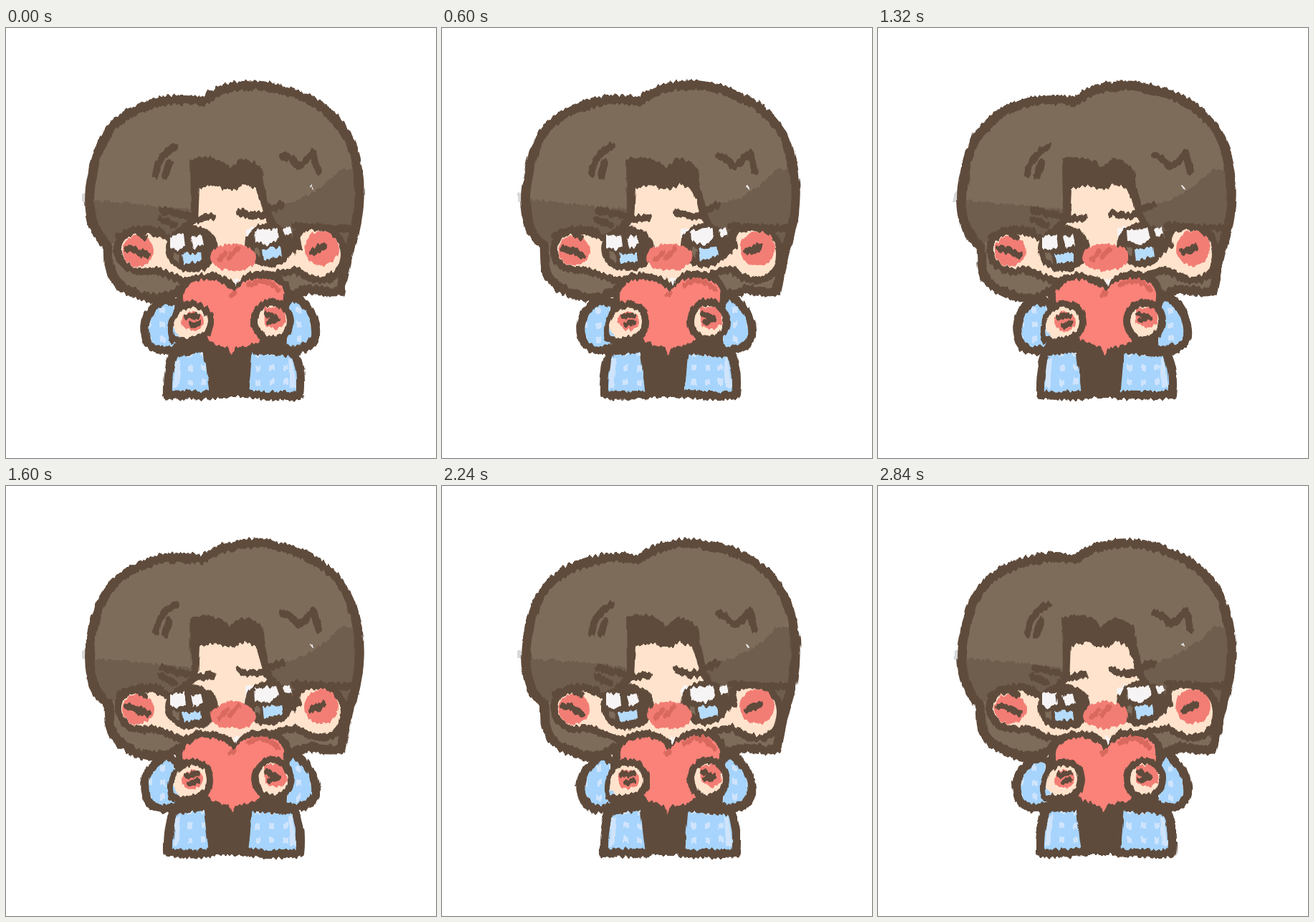
An HTML page for the animation above (2.88 s loop, 600 by 600 pixels).

```html
<!DOCTYPE html>
<html lang="en">
<head>
<meta charset="utf-8">
<title>Shy heart</title>
<style>
  html, body { margin: 0; width: 100%; height: 100%; overflow: hidden; background: #fff; }
  svg { display: block; width: 100vw; height: 100vh; }
  svg { --ink: #5f4b3c; --hair: #7e6c5b; --shade: #6f5d4e; --skin: #ffe3cc;
        --pink: #fa8279; --blush: #f27d74; --red: #d9695f; --sky: #a6d4fd; --pale: #cfe4fc; }
  path, ellipse { stroke-linecap: round; stroke-linejoin: round; }
  .ink { fill: var(--ink); }
  .line { fill: none; stroke: var(--ink); stroke-width: 10; }
  .hair { fill: var(--hair); }
  .shade { fill: var(--shade); }
  .skin { fill: var(--skin); }
  .pink { fill: var(--pink); }
  .blush { fill: var(--blush); }
  .sky { fill: var(--sky); }
  .pale { fill: var(--pale); }
  .white { fill: #f7f4f5; }
  .red { fill: none; stroke: var(--red); stroke-width: 7; }
  .clothes { fill: url(#plaid); stroke: var(--ink); stroke-width: 12; }
  .outlined { stroke: var(--ink); stroke-width: 20; paint-order: stroke; }
</style>
</head>
<body>
<svg viewBox="0 0 600 600">
  <defs>
    <!-- Slow sideways wobble, then fine vertical bristles -->
    <filter id="rough" filterUnits="userSpaceOnUse" x="0" y="0" width="600" height="600"
            color-interpolation-filters="sRGB">
      <feTurbulence class="noise" type="fractalNoise" baseFrequency=".03" result="slow"/>
      <feColorMatrix in="slow" values="1 0 0 0 0  0 1 0 0 0  0 0 1 0 0  0 0 0 0 1" result="wobble"/>
      <feDisplacementMap in="SourceGraphic" in2="wobble" scale="4"
                         xChannelSelector="R" yChannelSelector="G" result="bent"/>
      <feTurbulence class="noise" type="fractalNoise" baseFrequency=".24 .04" result="fast"/>
      <feColorMatrix in="fast" values=".35 0 0 0 .325  0 1 0 0 0  0 0 1 0 0  0 0 0 0 1" result="bristle"/>
      <feDisplacementMap in="bent" in2="bristle" scale="10"
                         xChannelSelector="R" yChannelSelector="G"/>
    </filter>
    <pattern id="plaid" width="19" height="20" patternUnits="userSpaceOnUse" patternTransform="translate(4 7)">
      <path class="sky" d="M0 0H19V20H0Z"/>
      <path class="pale" d="M2 3H9V11H2Z"/>
    </pattern>
    <path id="head" d="M274 103C300 82 335 76 366 82C432 92 474 128 486 178C497 215 495 258 483 298
      C475 320 472 345 467 367Q445 370 425 364L402 372H318L245 364Q225 378 205 377Q185 374 167 364
      Q148 354 144 330L143 304C116 285 112 240 121 203C127 160 150 124 192 110C222 97 256 98 274 103Z"/>
    <clipPath id="inHead"><use href="#head"/></clipPath>
  </defs>

  <g filter="url(#rough)">
    <!-- Body -->
    <path class="ink" d="M232 380H396V452H338V515H282V450H232Z"/>
    <path class="clothes" d="M222 378C198 392 189 410 195 432Q204 456 236 448L250 440L240 385Z"/>
    <path class="clothes" d="M400 372C424 385 434 410 432 430Q424 454 385 447L390 385Z"/>
    <path class="clothes" d="M235 452L282 446L290 511Q255 514 226 512Q225 475 235 452Z"/>
    <path class="clothes" d="M338 448L403 453Q414 480 410 512Q375 515 332 511Z"/>
    <path class="pale" d="M236 464L243 460L240 502H233ZM394 462L399 460L405 502H396Z"/>

    <!-- Hair -->
    <path d="M106 230H113V242H106Z" fill="#d8d8d8"/>
    <use href="#head" class="hair"/>
    <path class="shade" clip-path="url(#inHead)" d="M110 239Q180 245 262 253L365 251Q430 240 468 196L500 200V300H110Z"/>
    <use href="#head" fill="none" stroke="#5f4b3c" stroke-width="13"/>
    <path class="line" d="M209 204Q212 179 237 165M222 206L228 188M386 178Q398 180 407 193L417 188L429 174L436 200"/>
    <path d="M425 221L428 225" stroke="#eee" stroke-width="2"/>

    <!-- Face -->
    <path class="skin outlined" d="M270 223L298 219L318 226L332 218L352 226L360 262L380 300L402 316L412 289
      C430 275 466 284 467 314C467 338 452 348 436 347Q420 344 405 332L380 338L345 346L320 358L290 345L247 348L205 333
      C185 338 163 330 161 312C158 290 190 282 208 291L232 300L268 270Z"/>
    <path class="ink" d="M257 184Q280 175 302 187L312 196L327 183Q347 184 358 198L364 246L354 238L347 221L330 215L319 224H302L295 215L282 221L268 224L266 262L258 256Z"/>
    <path class="line" d="M218 254L262 264M216 266L235 275M366 254L384 247M158 290Q185 276 215 284M403 276Q440 280 482 279"/>
    <ellipse class="blush" cx="184" cy="311" rx="22" ry="21"/>
    <ellipse class="blush" cx="440" cy="308" rx="24" ry="24"/>
    <path class="line" d="M169 308L180 310L196 317M427 312L442 305"/>
    <path class="line" d="M185 287L194 292M404 286L409 304" style="stroke-width:8"/>
    <path class="white" d="M334 280L346 277L341 296L334 292Z"/>

    <!-- Eyes -->
    <ellipse class="ink" cx="259" cy="308" rx="37" ry="32"/>
    <ellipse class="ink" cx="367" cy="303" rx="34" ry="31"/>
    <path class="hair" d="M233 313L243 317L242 327L234 322ZM347 306L355 308L354 319L347 314Z"/>
    <path class="white" d="M229 290L249 288L251 305L240 311L229 306ZM258 293L272 289L275 302L262 308ZM347 282L377 279L381 293L366 303L348 298ZM386 281L396 278L399 288L389 291Z"/>
    <path d="M246 316L272 314L273 325L249 329ZM358 308L383 306L385 318L360 325Z" fill="#b6dcfc"/>
    <path class="line" d="M266 267L288 264M326 257Q342 264 360 261"/>

    <!-- Nose -->
    <ellipse class="blush" cx="317" cy="320" rx="32" ry="19"/>
    <path class="red" d="M298 323L308 313M312 321L324 308"/>

    <!-- Heart -->
    <path class="pink outlined" d="M318 369C300 345 255 345 248 372C246 400 275 425 285 437Q318 454 352 437
      C365 420 390 400 388 370C384 344 335 340 318 369Z"/>
    <path class="skin" d="M303 341H337L320 357Z"/>
    <path class="white" d="M317 350H326L321 361Z"/>
    <path class="pink" d="M308 440H322L315 456Z"/>
    <path class="red" d="M338 359Q362 343 380 366M313 373L318 370"/>

    <!-- Hands -->
    <ellipse class="skin" cx="259" cy="411" rx="27" ry="25"/>
    <ellipse class="blush" cx="260" cy="409" rx="15" ry="13"/>
    <path class="line" d="M240 394C252 380 284 382 285 410C285 434 255 441 232 435"/>
    <path class="line" d="M240 394Q224 414 232 435" style="stroke-width:7"/>
    <ellipse class="skin" cx="372" cy="409" rx="25" ry="26"/>
    <path class="blush" d="M360 391L388 388L391 412L378 421L361 414Z"/>
    <ellipse class="line" cx="372" cy="409" rx="25" ry="26"/>
    <path class="line" style="stroke-width:8"
          d="M252 403L267 401M258 414L267 411M364 399L377 404M367 410L379 406"/>
  </g>
</svg>
<script>
  const STEP = 40, POSES = 72;
  const noises = document.querySelectorAll('.noise');
  let shown = -1;

  function draw() {
    const pose = Math.floor(performance.now() / STEP) % POSES;
    if (pose !== shown) {
      shown = pose;
      noises.forEach((noise, i) => noise.setAttribute('seed', 1 + pose + i * POSES));
    }
    requestAnimationFrame(draw);
  }
  draw();
</script>
</body>
</html>
```
